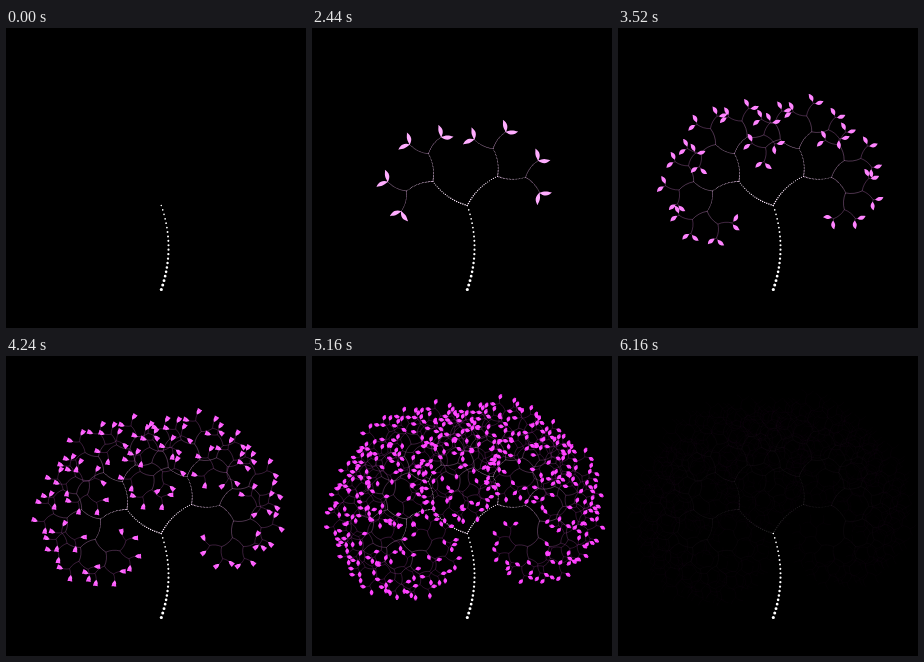
Write an HTML page with a canvas that moves like this. It is 300 by 300 pixels and loops after 6.2 s.

```html
<!DOCTYPE html>
<html lang="en">
<head>
<meta charset="utf-8">
<title>Growing tree</title>
<style>
  html, body { margin: 0; width: 100%; height: 100%; overflow: hidden; background: #000; }
  canvas { display: block; width: 300px; height: 300px; }
</style>
</head>
<body>
<canvas id="stage" width="300" height="300"></canvas>
<script>
const ctx = document.getElementById('stage').getContext('2d');
const LOOP = 6200, STEP = 40, START = 80, GROW = 500, FADE = 320;
const DEPTH = 10, TRUNK = 84, BEND = 0.086, DOTS = 20;
const LEFT = -55 * Math.PI / 180, RIGHT = 46 * Math.PI / 180;

// Each generation's branches are TRUNK / (g + 1) long and bend the opposite way.
function makeBranch(x, y, angle, g) {
  const len = TRUNK / (g + 1);
  return { x, y, angle, len, sin: Math.sin(angle), cos: Math.cos(angle),
           bend: len * BEND * (g % 2 ? -1 : 1) };
}

function pointAt(b, t) {
  const along = b.len * t, side = 4 * t * (1 - t) * b.bend;
  return [b.x + b.sin * along + b.cos * side, b.y - b.cos * along + b.sin * side];
}

function normalAt(b, t) {
  const slope = 4 * (1 - 2 * t) * b.bend;
  const dx = b.sin * b.len + b.cos * slope, dy = -b.cos * b.len + b.sin * slope;
  const d = Math.hypot(dx, dy);
  return [-dy / d, dx / d];
}

const levels = [[makeBranch(155.3, 261.5, 0, 0)]];
for (let g = 1; g <= DEPTH; g++) {
  levels.push(levels[g - 1].flatMap(b => {
    const [x, y] = pointAt(b, 1);
    return [LEFT, RIGHT].map(turn => makeBranch(x, y, b.angle + turn, g));
  }));
}

const tint = g => `rgb(255,${Math.round(255 - 20.5 * g)},255)`;
const dotRadius = s => 1.6 / (s + 1);

function drawDots(g, end) {
  ctx.beginPath();
  for (const b of levels[g]) {
    for (let i = 0; i < DOTS; i++) {
      const t = i / (DOTS - 1);
      if (t > end) break;
      const [x, y] = pointAt(b, t), r = dotRadius(g + t);
      ctx.moveTo(x + r, y);
      ctx.arc(x, y, r, 0, Math.PI * 2);
    }
  }
  ctx.fillStyle = tint(g);
  ctx.fill();
}

// Fine twigs: a hairline with the same ink as the tiny dots.
function drawTwigs(g, end) {
  const r = dotRadius(g + 0.5), gap = TRUNK / (g + 1) / (DOTS - 1);
  ctx.beginPath();
  for (const b of levels[g]) {
    ctx.moveTo(b.x, b.y);
    for (let i = 1; i <= 4; i++) ctx.lineTo(...pointAt(b, end * i / 4));
  }
  ctx.lineWidth = Math.PI * r * r / gap;
  ctx.strokeStyle = tint(g);
  ctx.stroke();
}

// The leaf is a lens between rear and front, clipped to this generation.
function drawLeaves(g, rear, front) {
  const from = Math.max(0, rear - g), to = Math.min(1, front - g);
  if (to <= from) return;
  const n = g < 4 ? 20 : 8, fat = 2.3 - 0.045 * front;
  ctx.beginPath();
  for (const b of levels[g]) {
    const back = [];
    for (let i = 0; i <= n; i++) {
      const t = from + (to - from) * i / n;
      const u = (g + t - rear) / (front - rear);
      const r = fat * Math.sin(Math.PI * u);
      const [x, y] = pointAt(b, t), [nx, ny] = normalAt(b, t);
      if (i) ctx.lineTo(x + nx * r, y + ny * r);
      else ctx.moveTo(x + nx * r, y + ny * r);
      back.push([x - nx * r, y - ny * r]);
    }
    for (const q of back.reverse()) ctx.lineTo(...q);
    ctx.closePath();
  }
  ctx.fillStyle = tint(g);
  ctx.fill();
}

function draw(time) {
  const front = Math.max(0, (time - START) / GROW);
  const rear = Math.max(0, front - 0.7 - 0.16 / Math.max(1, front));
  ctx.globalAlpha = 1;
  ctx.fillStyle = '#000';
  ctx.fillRect(0, 0, 300, 300);
  drawDots(0, 1);
  ctx.globalAlpha = Math.min(1, (LOOP - time) / FADE);
  for (let g = 1; g <= DEPTH && g < front; g++) {
    (g < 4 ? drawDots : drawTwigs)(g, Math.min(1, front - g));
  }
  for (let g = 0; g <= DEPTH; g++) drawLeaves(g, rear, front);
}

const begin = performance.now();
let last = -1;
function tick() {
  const t = (performance.now() - begin) % LOOP;
  const time = Math.floor(t / STEP) * STEP;
  if (time !== last) draw(last = time);
  requestAnimationFrame(tick);
}
tick();
</script>
</body>
</html>
```
